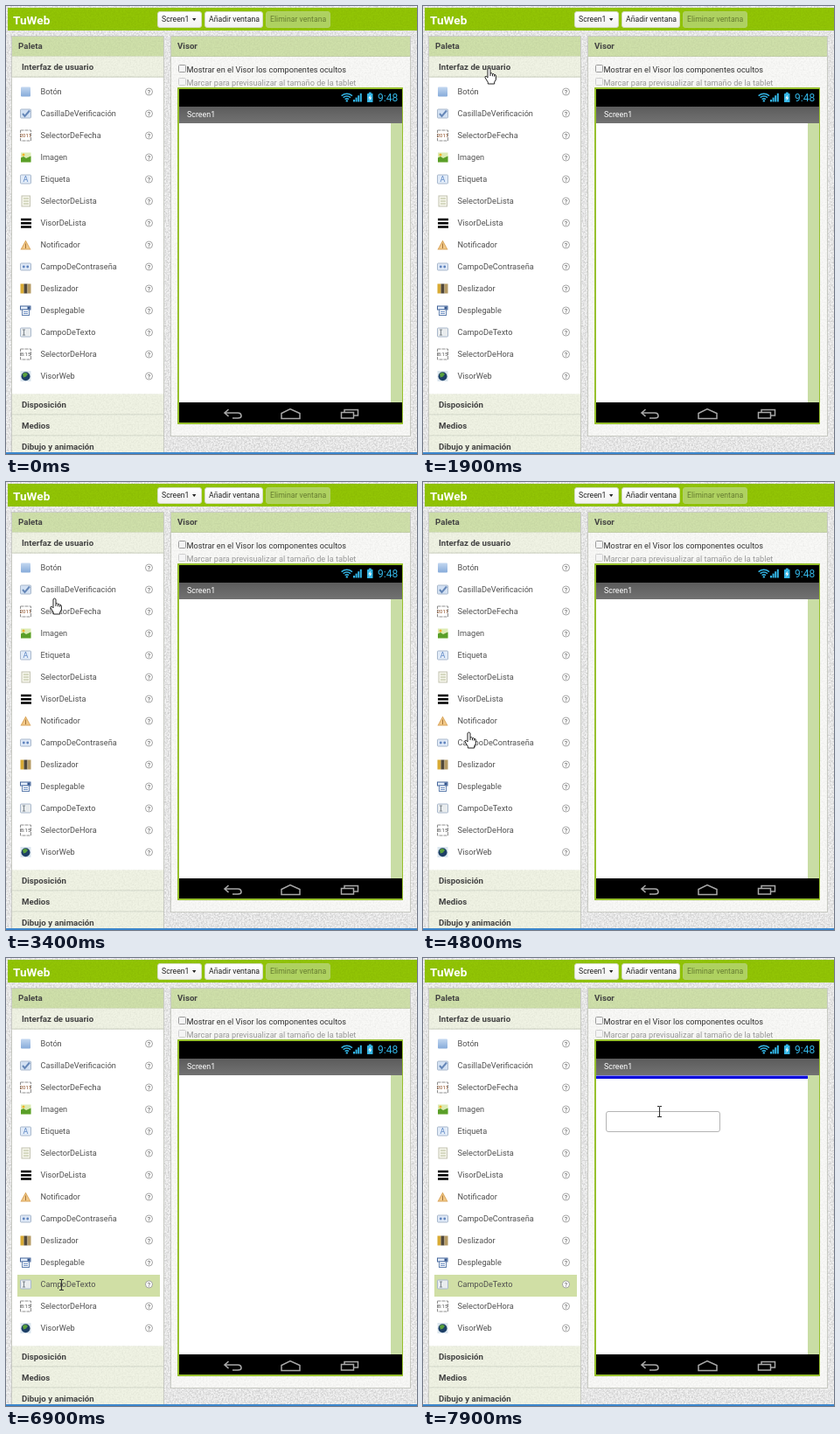
These frames come from a looping animation (470x512 px, 8000 ms). An HTML page:

```html
<!DOCTYPE html>
<html lang="es">
<head>
<meta charset="utf-8">
<title>Paleta y visor</title>
<style>
  html, body { margin: 0; width: 100%; height: 100%; overflow: hidden; background: #e9e9e9; }
  svg { display: block; width: 100%; height: 100%; }
  text { font-family: Roboto, "Open Sans", sans-serif; font-size: 9.2px; fill: #505050; white-space: pre; }
  .bold { font-weight: 700; font-size: 9.7px; fill: #444; }
  .btn { font-size: 8.7px; fill: #222; }
</style>
</head>
<body>
<svg id="stage" viewBox="0 0 470 512" xmlns="http://www.w3.org/2000/svg">
  <defs>
    <filter id="grain" x="0" y="0" width="100%" height="100%" color-interpolation-filters="sRGB">
      <feTurbulence type="fractalNoise" baseFrequency=".55" numOctaves="2" seed="4"/>
      <feColorMatrix values="0 0 0 0 0  0 0 0 0 0  0 0 0 0 0  .24 0 0 0 -.08"/>
    </filter>
    <linearGradient id="bar" x2="0" y2="1"><stop stop-color="#5c5c5c"/><stop offset="1" stop-color="#727272"/></linearGradient>
    <linearGradient id="blue" x2="0" y2="1"><stop stop-color="#c3d7f0"/><stop offset="1" stop-color="#86abda"/></linearGradient>
    <linearGradient id="face" x2="0" y2="1"><stop stop-color="#fff"/><stop offset="1" stop-color="#f1f1f1"/></linearGradient>
  </defs>
  <g id="base"></g>
  <g id="palette"></g>
  <g id="phone"></g>
  <rect id="drop" x="198" y="134.5" width="242" height="3.5" fill="#0808dc"/>
  <rect id="field" width="130" height="23" rx="2.5" fill="#fff" stroke="#b4b4b4"/>
  <path id="arrow" d="M0 0V15L3.5 11.8L6 17.5L8.4 16.4L6 11H11Z" fill="#fff" stroke="#111" stroke-linejoin="round"/>
  <path id="hand" d="M-1.5 .6Q0 -1.6 1.5 .6V5.6Q3 4.5 4 6.2Q5.5 5.4 6.1 7Q7.9 6.6 7.9 8.6V12.5L6.2 15.4V17.5H-1.2V15.7L-4.5 10.4Q-4.8 8.5 -3 8.8L-1.5 10.4ZM1.5 5.6V8.5M4 6.2V8.8M6.1 7V9.2" fill="#fff" stroke="#222" stroke-linejoin="round"/>
  <path id="beam" d="M-2.5 -6H-.8L0 -5.3L.8 -6H2.5M0 -5.3V5.3M-2.5 6H-.8L0 5.3L.8 6H2.5" fill="none" stroke="#333" stroke-width="1.1"/>
</svg>
<script>
const LOOP = 8000, STEP = 100;
const el = id => document.getElementById(id);

const rect = (x, y, w, h, fill, more = '') =>
  `<rect x="${x}" y="${y}" width="${w}" height="${h}" fill="${fill}" ${more}/>`;
const line = (d, stroke, width = 1) => `<path d="${d}" fill="none" stroke="${stroke}" stroke-width="${width}"/>`;
const shape = (d, fill) => `<path d="${d}" fill="${fill}"/>`;
const dot = (x, y, r, fill, more = '') => `<circle cx="${x}" cy="${y}" r="${r}" fill="${fill}" ${more}/>`;
const text = (x, y, s, more = '') => `<text x="${x}" y="${y}" ${more}>${s}</text>`;
const heading = (x, y, s) => text(x, y, s, 'class="bold"');

function drawBase() {
  const grain = opacity => rect(0, 0, 470, 510, '#000', `filter="url(#grain)" opacity="${opacity}"`);
  const panel = (x, w, h, title) =>
    rect(x + .5, 34.5, w, h, '#f9f9f7', 'stroke="#cbcdc6"') +
    rect(x + 1, 35, w - 1, 22, '#cfe0aa') + line(`M${x + 1} 57.5h${w - 1}`, '#c5d1aa') + heading(x + 8, 49, title);
  const section = (y, title) =>
    rect(7, y, 173, 24, '#f0f3e4') + line(`M7 ${y + 23.5}h173`, '#cdd2c2') + heading(18, y + 15.5, title);
  const button = (x, w, label) =>
    rect(x + .5, 6.5, w, 18, 'url(#face)', 'rx="2.5" stroke="#d4dcc0"') + text(x + 5, 18, label, 'class="btn"');
  const check = (y, border, color, label, id) =>
    rect(197.5, y, 8, 8, '#f4f4f4', `rx="1" stroke="${border}" id="${id}"`) +
    text(206.5, y + 8.5, label, `style="fill:${color}"`);
  el('base').innerHTML = [
    rect(0, 0, 470, 512, '#f2f2f2'), grain(1),
    rect(2, 2, 468, 26, '#92c505'),
    panel(6, 174, 480, 'Paleta'),
    panel(188, 274, 457, 'Visor'),
    section(57.5, 'Interfaz de usuario'),
    ['Disposición', 'Medios', 'Dibujo y animación'].map((s, i) => section(443.5 + 24 * i, s)).join(''),
    grain(.4),
    rect(7, 82, 173, 361, '#fff'),
    rect(0, 510, 470, 2, '#3b86cc'),
    text(8, 20.5, 'TuWeb', 'font-weight="700" style="font-size:13.6px;fill:#fff"'),
    button(173, 50, 'Screen1'), shape('M213 14H217.4L215.2 17Z', '#222'),
    button(227, 66, 'Añadir ventana'),
    rect(297.5, 6.5, 73, 18, '#aed160', 'rx="2.5" stroke="#b2d06c"'),
    text(302, 18, 'Eliminar ventana', 'class="btn" style="fill:#667c30"'),
    check(67.5, '#9b9b9b', '#333', 'Mostrar en el Visor los componentes ocultos', 'check'),
    check(82.5, '#cfcfcf', '#999', 'Marcar para previsualizar al tamaño de la tablet', 'check2')
  ].join('');
}

// Icons live in a 13 by 13 square.
const tile = (fill, y = 1, h = 11) => rect(.5, y + .5, 12, h - 1, fill, 'rx="1" stroke="#a9b8cc"');
const letter = (s, size, fill) =>
  text(6.5, 6.5 + size * .36, s, `text-anchor="middle" style="font-size:${size}px;fill:${fill}"`);
const stamp = (s, ink) =>
  rect(.5, .5, 12, 12, '#fff', 'stroke="#8e8e8e" stroke-dasharray="4 1"') + letter(s, 6, ink);

const items = {
  'Botón': rect(1, 1, 11, 11, 'url(#blue)', 'rx="1"'),
  'CasillaDeVerificación': tile('#d3e1f3') + line('M3 6.5L5.5 9.5L11 3', '#6687b8', 2),
  'SelectorDeFecha': stamp('2011', '#8a4a20'),
  'Imagen': rect(1, 1, 11.5, 11, '#dcebb4') + shape('M1 7L4 5.5L7 7.5L12.5 5V12H1Z', '#5a9f28') + dot(4, 3.5, 1.5, '#f0b429'),
  'Etiqueta': tile('#e2ecf9') + letter('A', 9, '#5f88c4'),
  'SelectorDeLista': rect(2, .5, 9.5, 12, '#f6f6ec', 'stroke="#c3c3b2"') + line('M4 3.5H10M4 6.5H10M4 9.5H10', '#b7bd98'),
  'VisorDeLista': line('M1 2.5H13M1 6.8H13M1 11H13', '#000', 2.6),
  'Notificador': shape('M6.5 1L12.5 12H.5Z', '#d9a45a') + shape('M6.5 3L11 11H2Z', '#f2c988') + line('M6.5 5V10.5', '#a5743a'),
  'CampoDeContraseña': tile('#dfe9f7', 2, 9) + dot(4.3, 6.5, 1.4, '#5e83bd') + dot(8.7, 6.5, 1.4, '#5e83bd'),
  'Deslizador': rect(.5, 1, 4, 11, '#d9ab35') + rect(4.5, 1, 4, 11, '#51483a') + rect(8.5, 1, 4, 11, '#b59a63'),
  'Desplegable': rect(.5, 1.5, 11.5, 4, '#e6effb', 'stroke="#44659a"') + rect(2.5, 5.5, 8, 6.5, '#fff', 'stroke="#6382b0"') +
    rect(8.5, 2, 3, 3, '#33548c') + line('M4 8H9M4 10H9', '#6d8fc4'),
  'CampoDeTexto': tile('#e9ecee') + line('M3 3.5H6M4.5 3.5V9.5M3 9.5H6', '#7d868d'),
  'SelectorDeHora': stamp('8:15', '#555'),
  'VisorWeb': rect(.5, .5, 12, 12, '#dbe6ee') + dot(6.5, 6.7, 5, '#1d3f66') + shape('M3 4Q6 1 9 4L7 7L4 8Z', '#58a03c')
};

function drawPalette() {
  const row = ([name, icon], i) =>
    `<g transform="translate(0 ${91.5 + 25 * i})"><g transform="translate(16)">${icon}</g>` +
    text(39.5, 9.2, name) +
    dot(163.5, 6.5, 4, '#fff', 'stroke="#999" stroke-width=".9"') +
    text(163.5, 9, '?', 'text-anchor="middle" style="font-size:7px"') + '</g>';
  el('palette').innerHTML = rect(13, 362, 163, 25, '#d0dfa5', 'id="hover"') + Object.entries(items).map(row).join('');
}

function drawPhone() {
  const sky = '#33b5e5', nav = '#a8a8a8';
  const arc = r => `M${389.8 - r} ${108.8 - r}Q389.8 ${108.8 - r * 1.75} ${389.8 + r} ${108.8 - r}`;
  const signal = [0, 1, 2, 3].map(i => rect(397 + 2.6 * i, 107 - 2.4 * i, 2, 2.5 + 2.4 * i, sky)).join('');
  el('phone').innerHTML = [
    rect(197, 94, 256, 383, '#fff', 'stroke="#8dbb18" stroke-width="1.8"'),
    rect(198, 95, 255, 20, '#000'),
    rect(198, 115, 255, 19, 'url(#bar)'),
    rect(440, 134, 13, 319, '#c9dda5'),
    rect(198, 453, 255, 23, '#000'),
    line([6.2, 4.2, 2.2].map(arc).join(''), sky, 1.5),
    dot(389.8, 108.4, 1.2, sky),
    signal,
    rect(413, 100, 6.5, 10, sky, 'rx=".6"'), rect(414.8, 98.6, 3, 1.6, sky),
    shape('M417 101.5L414.3 105.6H416L415.4 108.8L418.2 104.6H416.5Z', '#fff'),
    text(425, 108.8, '9:48', `style="font-size:12px;fill:${sky}"`),
    text(207, 127, 'Screen1', 'style="font-size:8.9px;fill:#fff"'),
    line('M254.5 461L250 465L254.5 469M250.5 465H265Q269 465 269 468.5Q269 471 265 471H259', nav, 1.6),
    line('M315 471.5V465.5L325 460.5L336 465.5V471.5Z', nav, 1.5),
    line('M383.5 464.5H397.5V471H383.5ZM387 464V461.5H402.5V468H398', nav, 1.5)
  ].join('');
}

// The pointer glides from rest to rest; bend delays the vertical part of a glide.
const ENTER = 500, HOVER = 6000, GRAB = 7000, DROP = 7300;
const entry = { x: 385, y: 34 };
const glide = (from, to, x, y, bend = 1) => ({ from, to, x, y, bend });
const glides = [
  glide(ENTER, 800, 247, 65),
  glide(1000, 1600, 58, 71),
  glide(1700, 2100, 92, 71),
  glide(2100, 2600, 52, 72),
  glide(2600, 3400, 55, 133),
  glide(3700, 4400, 51, 274),
  glide(4680, 5230, 57, 374),
  glide(5400, 5700, 57, 372),
  glide(5900, HOVER, 62.5, 373),
  glide(6900, 7500, 290, 221, 3.5),
  glide(7500, 7700, 300, 179),
  glide(7700, LOOP, 260, 173.6)
];

const ease = (t, from, to) => {
  const k = Math.min(1, Math.max(0, (t - from) / (to - from)));
  return k * k * (3 - 2 * k);
};

function pointerAt(t) {
  return glides.reduce((p, g) => {
    const k = ease(t, g.from, g.to);
    return { x: p.x + (g.x - p.x) * k, y: p.y + (g.y - p.y) * k ** g.bend };
  }, entry);
}

// The dragged box trails the pointer a little and rises under it at the end.
function fieldAt(t) {
  const p = pointerAt(t - 20);
  return { x: p.x - 65, y: p.y + 8 - 9 * ease(t, 7700, 7900) };
}

function show(id, on) { el(id).style.display = on ? '' : 'none'; }

function place(id, on, p) {
  show(id, on);
  el(id).setAttribute('transform', `translate(${Math.round(p.x) + .5} ${Math.round(p.y) + .5})`);
}

function render(time) {
  const t = Math.floor(time / STEP) * STEP;
  const p = pointerAt(t);
  const kind = t < ENTER ? '' : t >= HOVER ? 'beam' : p.x < 181 ? 'hand' : 'arrow';
  for (const id of ['arrow', 'hand', 'beam']) place(id, id === kind, p);
  place('field', t >= GRAB, fieldAt(t));
  show('hover', t >= HOVER);
  show('drop', t >= DROP);
  el('check').setAttribute('stroke', t >= 800 && t < 1100 ? '#777' : '#9b9b9b');
}

drawBase();
drawPalette();
drawPhone();

function tick() {
  render(performance.now() % LOOP);
  requestAnimationFrame(tick);
}
tick();
</script>
</body>
</html>
```
